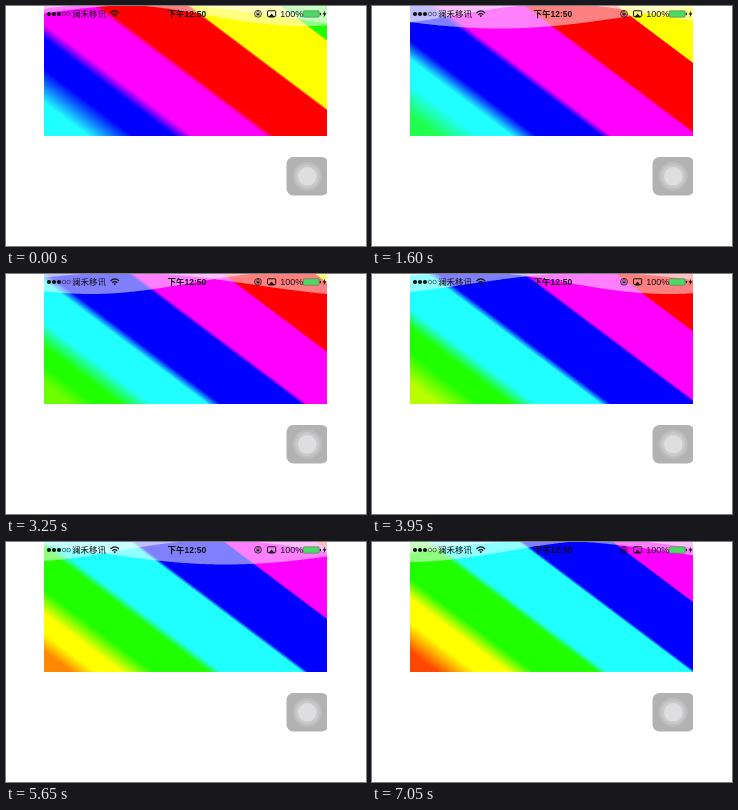
These frames come from a looping animation (360x240 px, 7.1 s). An HTML page with a canvas:

```html
<!DOCTYPE html>
<html lang="zh">
<head>
<meta charset="utf-8">
<title>Rainbow header</title>
<style>
  html, body { margin: 0; width: 100%; height: 100%; overflow: hidden; background: #fff; }
  canvas, svg { position: absolute; left: 0; top: 0; width: 360px; height: 240px; }
  text { font-family: "Noto Sans CJK SC", "Noto Sans CJK", sans-serif; font-size: 8.5px; }
  .latin { font-family: "Liberation Sans", Arial, sans-serif; }
  .level { font-size: 9px; }
</style>
</head>
<body>
<canvas id="stage" width="360" height="240"></canvas>
<svg viewBox="0 0 360 240">
  <defs>
    <clipPath id="screen"><rect x="38" y="0" width="283" height="240"/></clipPath>
  </defs>
  <g clip-path="url(#screen)">
    <rect x="280.5" y="151" width="42" height="38.5" rx="7" fill="#b2b2b2"/>
    <circle cx="301.3" cy="170.3" r="14.5" fill="#bdbdbd"/>
    <circle cx="301.3" cy="170.3" r="12" fill="#c9c9ca"/>
    <circle cx="301.3" cy="170.3" r="9.3" fill="#dedee1"/>
  </g>
  <g fill="#111">
    <circle cx="43" cy="8" r="2.1"/>
    <circle cx="48" cy="8" r="2.1"/>
    <circle cx="53" cy="8" r="2.1"/>
    <g fill="none" stroke="#111" stroke-width=".5">
      <circle cx="58" cy="8" r="1.8"/>
      <circle cx="62.6" cy="8" r="1.8"/>
    </g>
    <text x="66" y="11.2">澜禾移讯</text>
    <path d="M104.5 7Q108.8 2.8 113.1 7M106.3 8.8Q108.8 6.4 111.3 8.8" fill="none" stroke="#111" stroke-width="1.2"/>
    <path d="M107.4 9.8Q108.8 8.8 110.2 9.8L108.8 11.3Z"/>
    <text x="161.5" y="11.2" font-weight="700">下午<tspan class="latin">12:50</tspan></text>
    <g fill="none" stroke="#111">
      <circle cx="252" cy="7.8" r="3.4" stroke-width=".8"/>
      <path d="M250.8 7.4V6.6A1.2 1.2 0 0 1 253.2 6.6V7.4" stroke-width=".6"/>
      <rect x="261.5" y="4.8" width="8.2" height="5.6" rx=".6" stroke-width="1"/>
    </g>
    <rect x="250.5" y="7.4" width="3" height="2"/>
    <path d="M262.4 11.6L265.6 7.6L268.8 11.6Z"/>
    <text class="latin level" x="274.2" y="11">100%</text>
    <rect x="297.2" y="4.8" width="16" height="6.4" rx="1" fill="#4cd964" stroke="#555" stroke-width=".5"/>
    <rect x="313.8" y="6.7" width="1.1" height="2.6" rx=".5"/>
    <path d="M319.2 4.4L316.6 8.5H318.2L317.5 11.6L320.4 7.2H318.7Z"/>
  </g>
</svg>
<script>
const LOOP = 7100, TICK = 50;
const LEFT = 38, RIGHT = 321, HEIGHT = 130;
const SLANT = 1.33, SPAN = 500, FLAT_END = 66;
const ctx = document.getElementById('stage').getContext('2d');

// Pure hues, with red slightly raised in greens and cyans.
function hue(h) {
  const channel = shift => {
    const d = Math.abs(((h + shift) % 360 + 360) % 360 - 180);
    return Math.round(255 * Math.min(1, Math.max(0, (d - 60) / 60)));
  };
  const [r, g, b] = [channel(0), channel(60), channel(-60)];
  const green = 255 * Math.min(1, Math.max(0, 2 - Math.abs(((h % 360 + 360) % 360) - 120) / 60));
  const lift = h2 => h2 >= 60 && h2 <= 240 ? 32 * Math.min(1, (240 - h2) / 60) : 0;
  return `rgb(${Math.max(r, lift((h % 360 + 360) % 360))} ${greenOf(h)} ${blueOf(h)})`;
}
const ramp = (h, centre) => {
  const d = Math.abs(((h - centre) % 360 + 540) % 360 - 180);
  return 255 * Math.min(1, Math.max(0, 2 - d / 60));
};
const greenOf = h => ramp(h, 120);
const blueOf = h => ramp(h, 240);

// Bands moved by time t (seconds); the last stretch runs slower.
const progress = t => t < 5.65 ? t * 0.4225 : 2.387 + (t - 5.65) * 0.174;

// Where a band edge meets the lower border, and how soft it is there.
const edgeX = s => s < 3 ? 46 + 52 * s + 6.9 * s * s : 264 + 92 * (s - 3);
const edgeWidth = s => Math.min(45, Math.max(1, 45 * 0.42 ** (s - 1)));

function drawBands(t) {
  const p = progress(t);
  const x0 = -SLANT * HEIGHT;
  const len = SPAN / (1 + SLANT * SLANT);
  const g = ctx.createLinearGradient(x0, 0, x0 + len, -SLANT * len);
  const stop = (x, h) => {
    if (x <= SPAN) g.addColorStop(x / SPAN, hue(h));
  };
  stop(FLAT_END, 180 - 62 * p);
  for (let j = Math.ceil(-p); j <= 5; j++) {
    const s = j + p, x = edgeX(s), half = edgeWidth(s) / 2;
    if (s >= 1) stop(x - half, 120 + 60 * j);
    stop(x + half, 180 + 60 * j);
  }
  ctx.fillStyle = g;
  ctx.fillRect(LEFT, 0, RIGHT - LEFT, HEIGHT);
}

function drawWave(trough, length, amp, mid) {
  const k = 2 * Math.PI / length;
  ctx.beginPath();
  ctx.moveTo(LEFT, -20);
  for (let x = LEFT; x <= RIGHT; x++) {
    ctx.lineTo(x, mid - amp * Math.cos(k * (x - trough)));
  }
  ctx.lineTo(RIGHT, -20);
  ctx.fillStyle = 'rgba(255,255,255,.5)';
  ctx.fill();
}

function frame(now) {
  const t = Math.floor(now % LOOP / TICK) * TICK / 1000;
  ctx.clearRect(0, 0, 360, 240);
  drawBands(t);
  drawWave(145 + 150 * t, 515, 12, 10.5);
  drawWave(100 + 303 * t, 400, 11, 9);
}

const start = performance.now();
(function play() {
  frame(performance.now() - start);
  requestAnimationFrame(play);
})();
</script>
</body>
</html>
```
